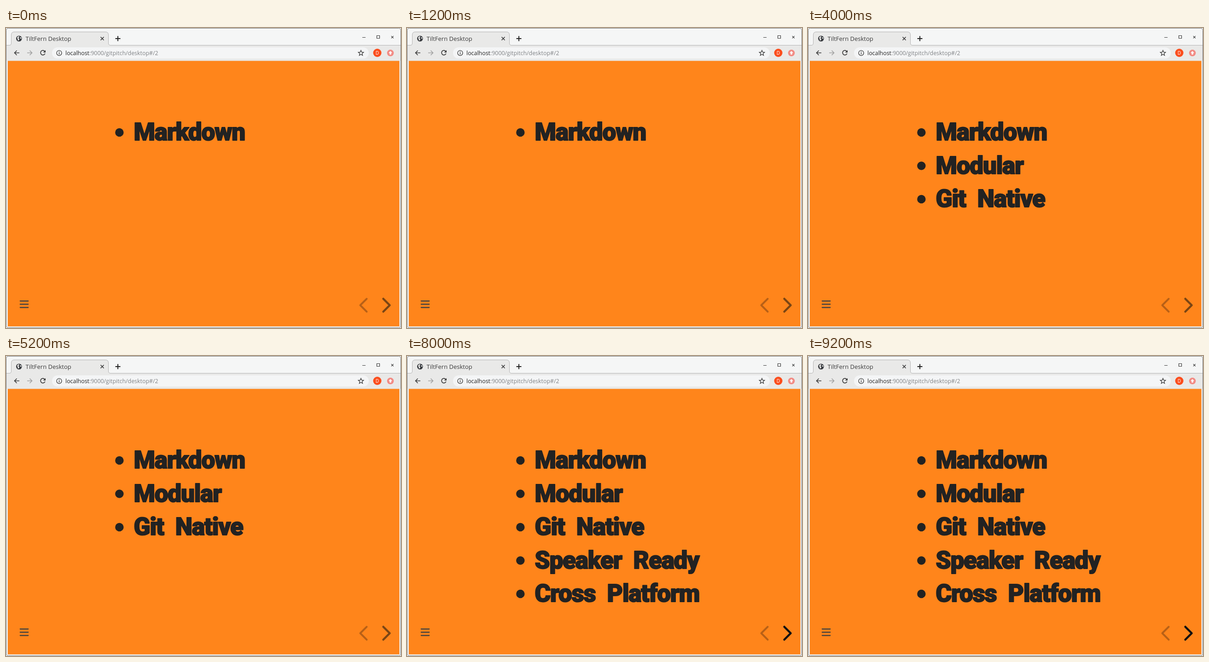
An HTML page that plays this animation: 858x652 px, repeating every 10000 ms.

```html
<!DOCTYPE html>
<html lang="en">
<head>
<meta charset="utf-8">
<title>Slides</title>
<style>
  html, body { margin: 0; width: 100%; height: 100%; overflow: hidden; background: #fff; }
  svg { display: block; width: 858px; height: 652px; }
  .ui { font-family: "Open Sans", "Noto Sans", sans-serif; }
  .line { fill: none; stroke: #3c3c3c; stroke-width: 1.7; }
  .bullets { fill: #222; }
  .bullets text {
    font: 900 53px Roboto, sans-serif;
    letter-spacing: -1.2px;
    word-spacing: 13px;
    stroke: #222;
    stroke-width: 2;
    stroke-linejoin: round;
  }
  .nav { fill: none; stroke-width: 4.5; stroke-linecap: round; stroke-linejoin: round; }
</style>
</head>
<body>
<svg viewBox="0 0 858 652" xmlns="http://www.w3.org/2000/svg">
  <!-- window -->
  <rect x=".5" y=".5" width="857" height="651" rx="4" fill="#f5f6f6" stroke="#777"/>
  <rect x="1" y="38" width="856" height="33" fill="#e9e9e8"/>
  <path d="M1 37.5H7Q11.500 37.500 11.500 33V15Q11.500 8.500 18 8.500H216Q222.500 8.500 222.500 15V33Q222.500 37.500 227 37.500H857V39H1Z" fill="#e9e9e8"/>
  <path d="M1 37.500H7Q11.500 37.500 11.500 33V15Q11.500 8.500 18 8.500H216Q222.500 8.500 222.500 15V33Q222.500 37.500 227 37.500H857" fill="none" stroke="#b4b4b4"/>

  <!-- tab -->
  <circle cx="28.300" cy="23" r="6.300" fill="#383b3f"/>
  <path d="M24 21L26 18.500 29 18 28.500 20.500 26.500 22 29 23.500 28 26.500 26 27.500 25.500 24.500ZM30.500 20.500L33 20 33.500 23.500 31 23Z" fill="#e9e9e8"/>
  <text class="ui" x="42.500" y="27.500" font-size="13" fill="#3b3b3b">TiltFern Desktop</text>
  <path class="line" stroke-width="1.500" d="M205.500 19.500l7 7m0-7l-7 7"/>
  <path class="line" style="stroke:#222;stroke-width:2" d="M237.500 23h11m-5.500-5.500v11"/>

  <!-- window buttons -->
  <path class="line" style="stroke-width:1.200" d="M774 20.500h7M805.500 16.500h6v6h-6zM836.800 17.300l5 5m0-5l-5 5"/>

  <!-- toolbar -->
  <path class="line" d="M29 54H18.500m5-5l-5 5 5 5"/>
  <path class="line" style="stroke:#a2a2a2" d="M46 54h10.500m-5-5l5 5-5 5"/>
  <path class="line" d="M84 50.500A5 5 0 1 0 84.800 55.500"/>
  <path d="M86 48v5.300h-5.300z" fill="#3c3c3c"/>
  <rect x="100" y="42" width="688" height="24.500" rx="12.250" fill="#f4f5f6"/>
  <circle class="line" style="stroke-width:1.300" cx="115.500" cy="54.300" r="5.500"/>
  <path class="line" style="stroke-width:1.400" d="M115.500 53.500v4M115.500 51v1.400"/>
  <text class="ui" x="129" y="58.500" font-size="12.400" fill="#808386"><tspan fill="#222">localhost</tspan>:9000/gitpitch/desktop#/2</text>
  <path id="star" class="line" style="stroke-width:1.300"/>
  <circle cx="806.500" cy="54" r="9" fill="#fb4d1d"/>
  <text class="ui" x="806.500" y="57.600" font-size="10" text-anchor="middle" fill="#fff">D</text>
  <circle cx="835" cy="54.300" r="7.300" fill="#f28b84"/>
  <path d="M835 50l4 4.300h-2.300v3.500h-3.400v-3.500H831z" fill="#fff"/>

  <!-- slide -->
  <rect x="3" y="71" width="852" height="578" fill="#ddd"/>
  <rect x="4" y="71.500" width="850.500" height="577" fill="#ff851b"/>
  <g id="bullets" class="bullets"></g>
  <path d="M31 593.300h17M31 600.300h17M31 607.300h17" fill="none" stroke="#55493c" stroke-width="2.800" stroke-linecap="round"/>
  <path class="nav" stroke="#b86016" style="stroke-width:4" d="M783.500 588.500l-14 14 14 14"/>
  <path id="next" class="nav" d="M819.500 588.500l14 14-14 14"/>
</svg>
<script>
  const LOOP = 10000, STEP = 2000;
  const TOPICS = ["Markdown", "Modular", "Git Native", "Speaker Ready", "Cross Platform"];
  const byId = id => document.getElementById(id);

  function add(parent, tag, attrs, text = "") {
    const node = document.createElementNS("http://www.w3.org/2000/svg", tag);
    for (const key in attrs) node.setAttribute(key, attrs[key]);
    node.textContent = text;
    return parent.appendChild(node);
  }

  const items = TOPICS.map((topic, i) => {
    const y = 227 + i * 72.5;
    const group = add(byId("bullets"), "g", {});
    add(group, "circle", { cx: 246.3, cy: y, r: 9.2 });
    add(group, "text", { x: 277.5, y: y + 17.3 }, topic);
    return group;
  });

  const starPoints = Array.from({ length: 10 }, (_, i) => {
    const angle = i * Math.PI / 5 - Math.PI / 2, radius = i % 2 ? 2.6 : 6;
    return [771 + radius * Math.cos(angle), 54.6 + radius * Math.sin(angle)];
  });
  byId("star").setAttribute("d", "M" + starPoints.join("L") + "Z");

  function render(time) {
    const current = Math.floor((time % LOOP) / STEP);
    items.forEach((item, i) => item.setAttribute("visibility", i <= current ? "visible" : "hidden"));
    byId("next").setAttribute("stroke", current === TOPICS.length - 1 ? "#111" : "#7a4514");
  }

  function tick() {
    render(performance.now());
    requestAnimationFrame(tick);
  }
  tick();
</script>
</body>
</html>
```
